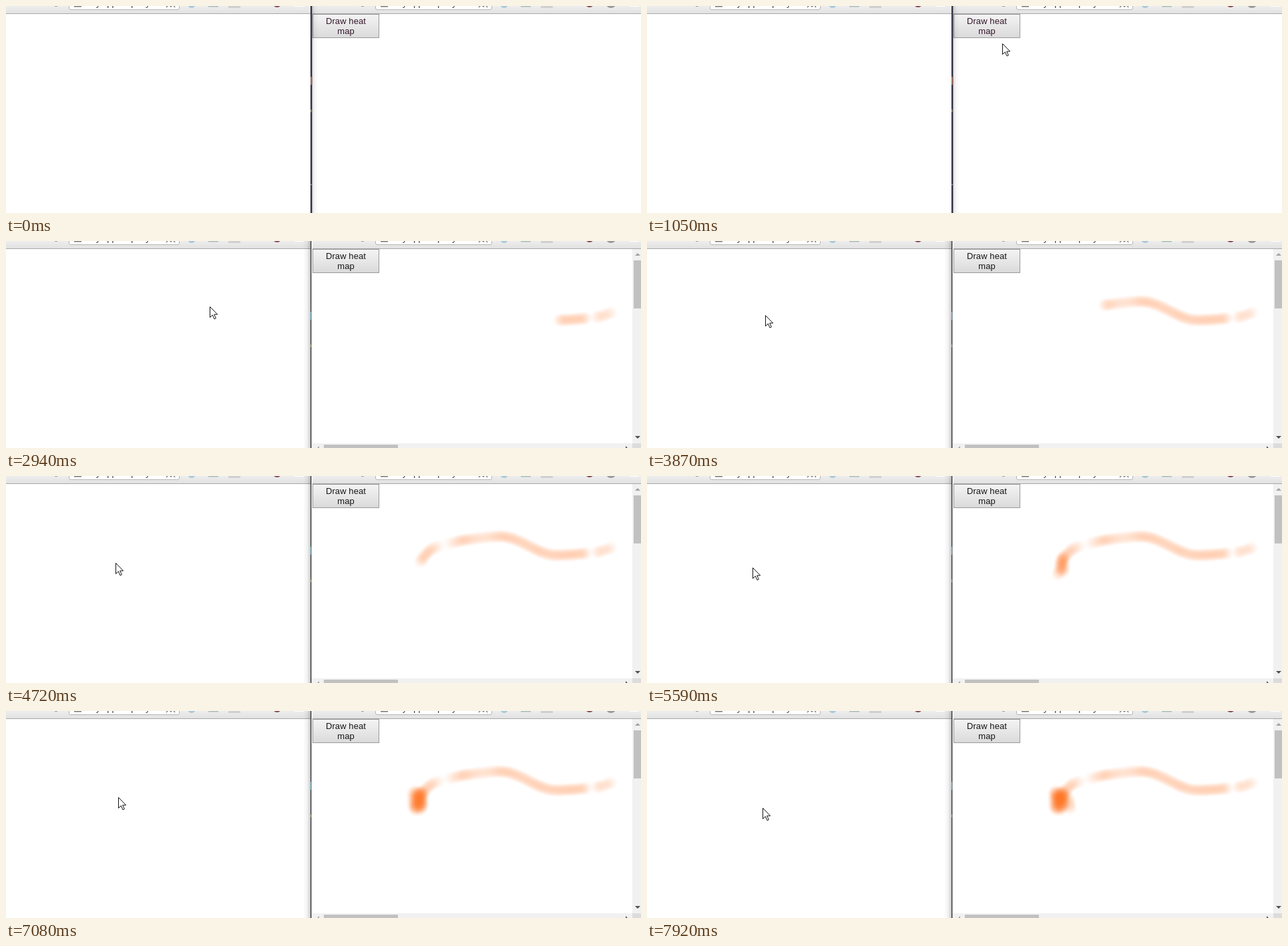
An HTML page that plays this animation: 951 px wide and 310 px high, repeating every 8000 ms.

```html
<!DOCTYPE html>
<html lang="en">
<head>
<meta charset="utf-8">
<title>Heat map</title>
<style>
html, body { margin: 0; width: 100%; height: 100%; overflow: hidden; background: #fff; }
svg { display: block; width: 951px; height: 310px; }
text { font-family: "Liberation Sans", Arial, sans-serif; }
</style>
</head>
<body>
<svg id="stage" viewBox="0 0 951 310" xmlns="http://www.w3.org/2000/svg">
  <defs>
    <linearGradient id="bar" x2="0" y2="1"><stop stop-color="#ededed"/><stop offset="1" stop-color="#e2e2e2"/></linearGradient>
    <linearGradient id="face" x2="0" y2="1"><stop stop-color="#f4f4f4"/><stop offset="1" stop-color="#dadada"/></linearGradient>
    <linearGradient id="hover" x2="0" y2="1"><stop stop-color="#fafafa"/><stop offset="1" stop-color="#e4e4e4"/></linearGradient>
    <linearGradient id="shade"><stop stop-color="#000" stop-opacity=".22"/><stop offset=".4" stop-color="#000" stop-opacity=".06"/><stop offset="1" stop-color="#000" stop-opacity="0"/></linearGradient>
    <radialGradient id="heat">
      <stop stop-color="#ff6d18" stop-opacity=".105"/>
      <stop offset=".5" stop-color="#ff6d18" stop-opacity=".08"/>
      <stop offset="1" stop-color="#ff6d18" stop-opacity="0"/>
    </radialGradient>
    <clipPath id="leftClip"><rect width="456" height="310"/></clipPath>
  </defs>
  <rect width="951" height="310" fill="#fff"/>
  <g id="leftBar" clip-path="url(#leftClip)"></g>
  <g id="rightBar"></g>
  <rect id="button" x="459.5" y="12.5" width="99" height="35" stroke="#9a9a9a"/>
  <g id="label" font-size="13" letter-spacing=".1" text-anchor="middle">
    <text x="509" y="27">Draw heat</text>
    <text x="509" y="42">map</text>
  </g>
  <g id="trail"></g>
  <g id="scrollbars">
    <path d="M938 12h13v298H457v-7h481z" fill="#f1f1f1"/>
    <path d="M938 303h13v7h-13z" fill="#dcdcdc"/>
    <path d="M940 29h11v72h-11zM476 305h111v5H476z" fill="#c1c1c1"/>
    <path d="M942 22l4-4 4 4zM469 307v3h-3z" fill="#a3a3a3"/>
    <path d="M942 292l4 4 4-4zM928 307v3h3z" fill="#505050"/>
  </g>
  <g id="leftActive">
    <rect x="459" width="9" height="310" fill="url(#shade)" opacity=".55"/>
    <rect x="456" width="2.5" height="310" fill="#303044"/>
    <path d="M456 106h2.5v12H456z" fill="#9b6c60"/>
    <path d="M456 155h1.5v4H456z" fill="#8c7f50"/>
    <path d="M456 267h2.5v1H456z" fill="#9a9aa4"/>
  </g>
  <g id="rightActive">
    <rect x="-456" width="11" height="310" fill="url(#shade)" transform="scale(-1 1)"/>
    <rect x="456" width="1.4" height="310" fill="#35353a"/>
    <path d="M456 106h1v12h-1z" fill="#5a9aa6"/>
    <path d="M456 155h1v4h-1z" fill="#8a8050"/>
  </g>
  <path id="cursor" d="M.5.5v16l3.8-3.6 2.7 6 2.4-1.1-2.7-5.8h5z" fill="#fff" stroke="#111" stroke-linejoin="round"/>
</svg>
<script>
const LOOP = 8000, STEP = 78, START = 270, LAG = 400;
const FOCUS = 1520, SCROLL = 2400;
const SWEEP = 2000, CIRCLE = 4400, TURN = 585, TURNS = 4;
const $ = id => document.getElementById(id);

// Places the pointer heads for: time, x, y
const stops = [
  [270, 865, 300], [900, 535, 58], [1050, 532, 56], [1370, 505, 28], [1700, 505, 28],
  [2000, 450, 107], [2140, 421, 116], [2540, 363, 120], [3080, 280, 92], [3410, 223, 98],
  [3640, 223, 98], [3850, 177, 111], [4400, 160, 131], [5570, 158, 136], [6740, 154, 136],
  [7050, 168, 129], [7500, 174, 149], [7900, 173, 145]
];

// Smooth curve through the stops that never overshoots a turn or a pause
function slope(i, axis) {
  const rate = k => (stops[k + 1][axis] - stops[k][axis]) / (stops[k + 1][0] - stops[k][0]);
  if (i === 0 || i === stops.length - 1) return 0;
  const a = rate(i - 1), b = rate(i);
  return a * b > 0 ? 2 * a * b / (a + b) : 0;
}

function curve(t, axis) {
  const last = stops.length - 1;
  if (t >= stops[last][0]) return stops[last][axis];
  const i = Math.max(0, stops.findIndex(p => p[0] > t) - 1);
  const a = stops[i], b = stops[i + 1], span = b[0] - a[0];
  const s = Math.max(0, (t - a[0]) / span), r = 1 - s;
  return a[axis] * r * r * (1 + 2 * s) + b[axis] * s * s * (3 - 2 * s)
    + span * s * r * (slope(i, axis) * r - slope(i + 1, axis) * s);
}

// Scribbling up and down, with a slower sway to the sides
function pointerAt(t) {
  const turn = Math.min(TURNS, Math.max(0, (t - CIRCLE) / TURN));
  return [
    curve(t, 1) + 5 * Math.sin(Math.PI * turn),
    curve(t, 2) + 14 * Math.sin(2 * Math.PI * turn)
  ];
}

// Browser toolbar, cut off by the top of the stage
function toolbar(x, end, wide) {
  const u = x + 94, w = wide ? 175 : 166, s = x + w - 166;
  return `<rect x="${x}" width="${end - x}" height="11" fill="url(#bar)"/>
    <rect x="${x}" y="11" width="${end - x}" height="1" fill="#a9a9a9"/>
    <g transform="translate(0 -1)">
      <circle cx="${x + 75}" cy="-3" r="4" fill="none" stroke="#66705f" stroke-width="1.6"/>
      <rect x="${u + .5}" y="-12" width="${w - 1}" height="18.5" rx="2.5" fill="#fff" stroke="#b4b4b4"/>
      <path d="M${u + 8} 1.5h11" stroke="#777c70" stroke-width="2"/>
      <text x="${u + 30}" y="1" font-size="13" fill="#333">my.app/map/my</text>
      <path d="M${s + 240} 3l4-4 3 3 3-3 3 4" fill="none" stroke="#777" stroke-width="1.3"/>
      <circle cx="${s + 278}" cy="-2" r="6" fill="#a8c8da"/>
      <path d="M${s + 303} 1.5h15" stroke="#a9bcb8" stroke-width="2"/>
      <path d="M${s + 333} 0h18v4h-18z" fill="#d0d0d0"/>
      <circle cx="${s + 406}" cy="-4" r="7" fill="#85474b"/>
      ${wide ? '<circle cx="906" cy="-4" r="8" fill="#999"/>' : ""}
      <path d="M${wide ? 934 : 432} 1h14" stroke="#fff" stroke-width="2"/>
    </g>`;
}

// Heat spots are dropped every few pixels and mirrored in the right pane;
// fast moves leave fainter ones
function makeSpots() {
  const gaps = [[409, 422], [192, 204]], spots = [];
  let [px, py] = pointerAt(SWEEP), pt = SWEEP;
  for (let t = SWEEP; t < LOOP - LAG; t += 4) {
    const [x, y] = pointerAt(t), d = Math.hypot(x - px, y - py);
    if (d < 3.8) continue;
    const speed = d / (t - pt);
    [px, py, pt] = [x, y, t];
    if (x > 448 || gaps.some(([a, b]) => x > a && x < b)) continue;
    const el = document.createElementNS("http://www.w3.org/2000/svg", "circle");
    el.setAttribute("cx", x + 460);
    el.setAttribute("cy", y - 1.5);
    el.setAttribute("r", 11);
    el.setAttribute("fill", "url(#heat)");
    el.setAttribute("opacity", Math.min(1, .16 / speed));
    $("trail").append(el);
    spots.push({ el, t: t + LAG });
  }
  return spots;
}

const show = (el, on) => el.setAttribute("visibility", on ? "visible" : "hidden");

function render(time) {
  const t = START + Math.floor((time - START + 8) / STEP) * STEP;
  const [x, y] = pointerAt(t);
  const over = t >= START && x >= 459 && x < 559 && y < 48;
  const focused = time >= FOCUS;
  show($("cursor"), t >= START);
  $("cursor").setAttribute("transform", `translate(${Math.round(x)} ${Math.round(y)})`);
  $("button").setAttribute("fill", `url(#${over ? "hover" : "face"})`);
  $("label").setAttribute("fill", focused ? "#161616" : "#33172a");
  show($("leftActive"), !focused);
  show($("rightActive"), focused);
  show($("scrollbars"), time >= SCROLL);
  for (const s of spots) show(s.el, s.t <= t);
}

$("leftBar").innerHTML = toolbar(0, 456, false);
$("rightBar").innerHTML = toolbar(459, 951, true);
const spots = makeSpots();
const begin = performance.now();
function frame() {
  render((performance.now() - begin) % LOOP);
  requestAnimationFrame(frame);
}
frame();
</script>
</body>
</html>
```
